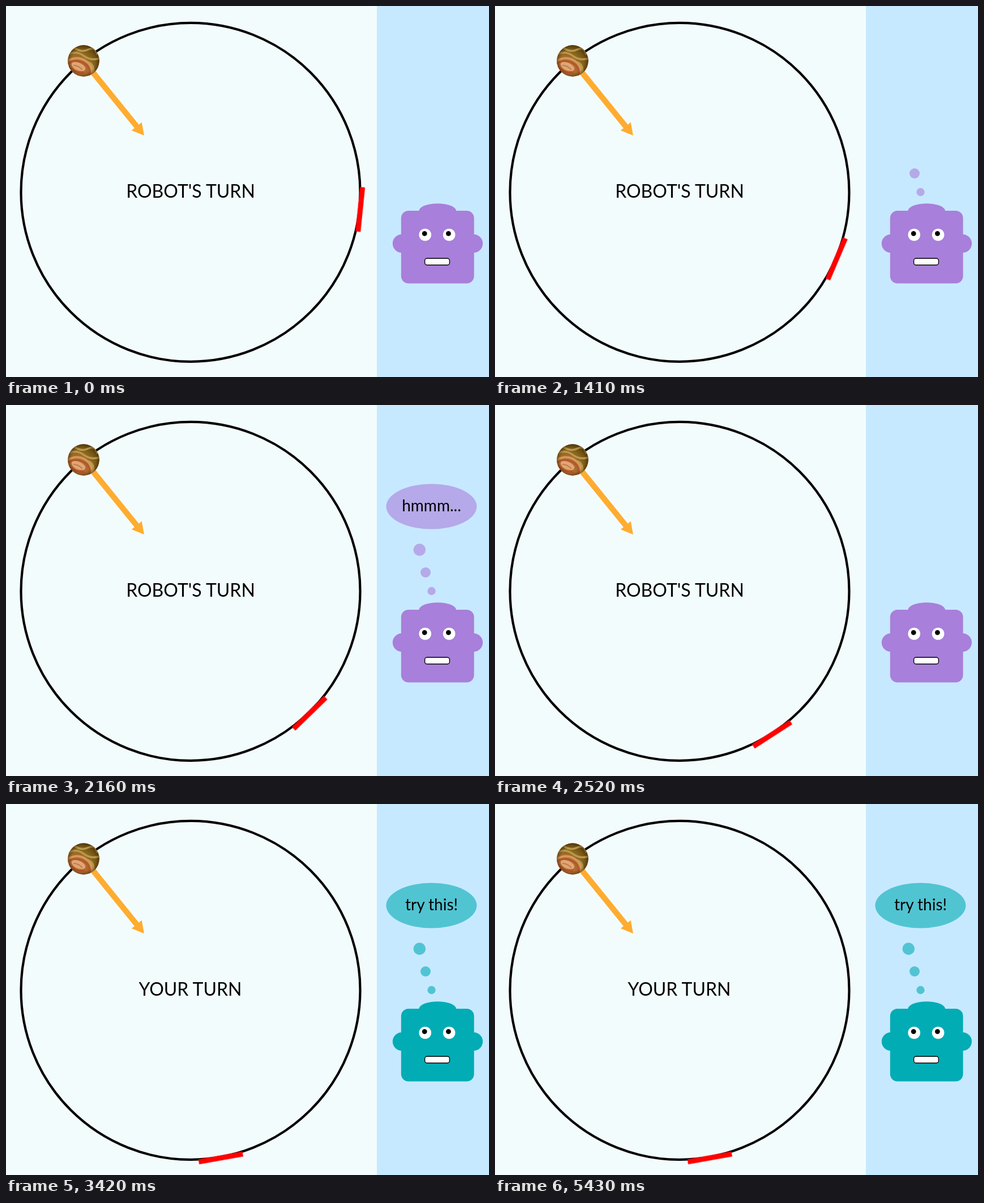
Write an HTML page that moves like this. It is 853 by 656 pixels and loops after 6.33 s.

```html
<!DOCTYPE html>
<html lang="en">
<head>
<meta charset="utf-8">
<title>Robot's turn</title>
<style>
  html, body { margin: 0; width: 100%; height: 100%; overflow: hidden; background: #f3fcfd; }
  svg { display: block; width: 853px; height: 656px; }
  text { font-family: Lato, sans-serif; text-anchor: middle; fill: #000; }
  .turn { font-size: 32px; }
  .thought { font-size: 28px; }
  .bubbles { fill: currentColor; fill-opacity: .6; }
  .head { fill: currentColor; }

  .bar, .step { animation: 6330ms linear infinite; }
  .step { animation-timing-function: step-end; }
  .bar { animation-name: slide; }
  .robot { animation-name: tint; }
  .dot1 { animation-name: dot1; }
  .dot2 { animation-name: dot2; }
  .dot3 { animation-name: dot3; }
  .cloud { animation-name: cloud; }
  .before { animation-name: before; }
  .after { animation-name: after; }

  /* The bar runs in three stretches with short stalls between them. */
  @keyframes slide {
    0%, 14.217% { transform: rotate(5.8deg); }
    14.218% { transform: rotate(7deg); }
    19.431%, 22.274% { transform: rotate(17.5deg); }
    22.275% { transform: rotate(23deg); }
    31.754%, 34.122% { transform: rotate(40.6deg); }
    34.123% { transform: rotate(45.7deg); }
    39.81% { transform: rotate(57.1deg); }
    44.076% { transform: rotate(64.2deg); }
    53.555%, 54.027% { transform: rotate(80.3deg); }
    54.028%, 100% { transform: rotate(79.8deg); }
  }
  @keyframes tint { 0% { color: #a87fda; } 54.028%, 100% { color: #02acb5; } }
  @keyframes before { 0% { opacity: 1; } 54.028%, 100% { opacity: 0; } }
  @keyframes after { 0% { opacity: 0; } 54.028%, 100% { opacity: 1; } }
  @keyframes dot1 {
    0%, 39.81% { opacity: 0; }
    16.588%, 45.972%, 100% { opacity: 1; }
  }
  @keyframes dot2 {
    0%, 39.81% { opacity: 0; }
    22.275%, 51.659%, 100% { opacity: 1; }
  }
  @keyframes dot3 {
    0%, 39.81% { opacity: 0; }
    28.436%, 54.028%, 100% { opacity: 1; }
  }
  @keyframes cloud {
    0%, 39.81% { opacity: 0; }
    34.123%, 54.028%, 100% { opacity: 1; }
  }
</style>
</head>
<body>
<svg viewBox="0 0 853 656">
  <defs>
    <radialGradient id="globe" cx=".3" cy=".72" r=".85">
      <stop offset="0" stop-color="#cf8a4c"/>
      <stop offset=".35" stop-color="#b06a30"/>
      <stop offset=".6" stop-color="#8a661f"/>
      <stop offset="1" stop-color="#523a08"/>
    </radialGradient>
    <radialGradient id="shade">
      <stop offset=".75" stop-color="#4a2c08" stop-opacity="0"/>
      <stop offset="1" stop-color="#4a2c08" stop-opacity=".55"/>
    </radialGradient>
    <clipPath id="disc"><circle r="28"/></clipPath>
  </defs>

  <rect width="853" height="656" fill="#f3fcfd"/>
  <rect x="655" width="198" height="656" fill="#c7e9ff"/>

  <circle cx="326" cy="329.3" r="299.5" fill="none" stroke="#000" stroke-width="4.2"/>
  <g transform="translate(326 329.3)">
    <rect class="bar" x="296.7" y="-39.5" width="9" height="79" fill="#f00"/>
  </g>

  <g transform="translate(137 97)">
    <path transform="rotate(51)" d="M0-5H149V-11.5L170 0 149 11.5V5H0Z" fill="#ffac30"/>
    <g clip-path="url(#disc)" fill="none" stroke-linecap="round">
      <circle r="28" fill="url(#globe)"/>
      <path d="M-16-23Q-4-14 8-20T24-12M-26-12Q-12-18 0-9T27-4M6 2Q18 4 18 20" stroke="#b8984a" stroke-width="3.5"/>
      <path d="M-28 0Q-12-9 2-1T15 24" stroke="#d09a58" stroke-width="4"/>
      <path d="M-28 5Q-14-4 0 4T10 25" stroke="#b4582a" stroke-width="3.5"/>
      <ellipse cx="-9" cy="10" rx="13" ry="6.5" transform="rotate(24 -9 10)" fill="#dfa775"/>
      <path d="M-26 10Q-15 22 0 21" stroke="#b9552a" stroke-width="4"/>
      <path d="M-17 8Q-8 9-3 15" stroke="#c47b48" stroke-width="2"/>
      <circle r="28" fill="url(#shade)"/>
    </g>
  </g>

  <text class="turn step before" x="326" y="339.3">ROBOT'S TURN</text>
  <text class="turn step after" x="325.5" y="339.3">YOUR TURN</text>

  <g class="robot step">
    <g class="bubbles">
      <circle class="step dot1" cx="751.5" cy="329" r="7.2"/>
      <circle class="step dot2" cx="741" cy="296" r="9"/>
      <circle class="step dot3" cx="730.3" cy="256" r="10.7"/>
      <ellipse class="step cloud" cx="751.4" cy="179.5" rx="80" ry="40"/>
    </g>
    <g class="head">
      <circle cx="699" cy="420" r="16.2"/>
      <circle cx="825.8" cy="420" r="16.2"/>
      <ellipse cx="762.2" cy="362.5" rx="33" ry="13.3"/>
      <rect x="697.8" y="362" width="128.8" height="128.6" rx="13"/>
    </g>
  </g>
  <g fill="#fff">
    <circle cx="740.2" cy="404.5" r="10.8"/>
    <circle cx="782.6" cy="404.5" r="10.8"/>
    <rect x="739.6" y="446.2" width="43.8" height="11.8" rx="4" stroke="#000" stroke-width="1.4"/>
  </g>
  <circle cx="739.2" cy="402.3" r="4.4"/>
  <circle cx="781.4" cy="402.3" r="4.4"/>

  <g class="step cloud">
    <text class="thought step before" x="751.5" y="188">hmmm...</text>
    <text class="thought step after" x="751.5" y="188">try this!</text>
  </g>
</svg>
</body>
</html>
```
